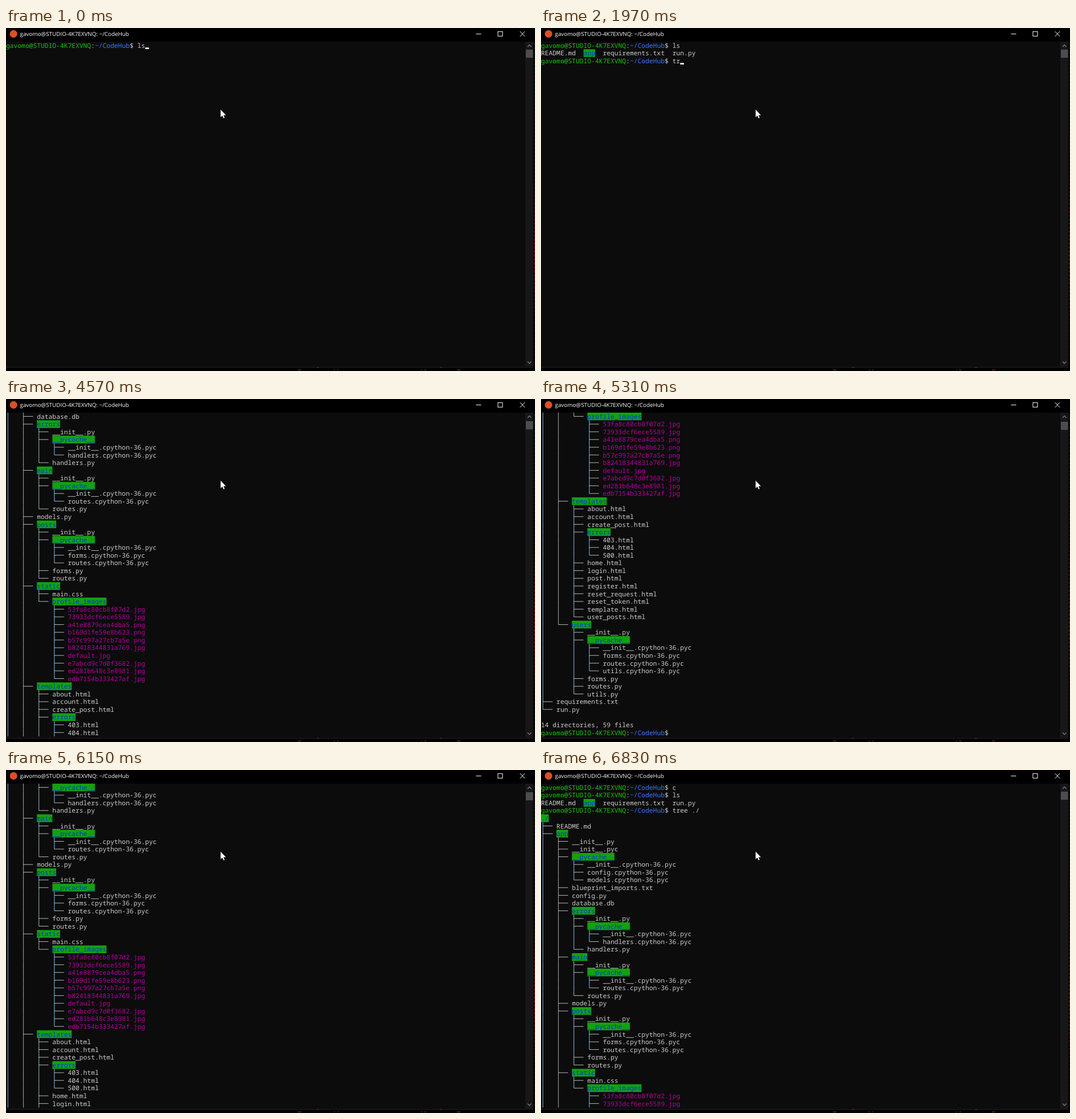
An HTML page that plays this animation: 928 px wide and 603 px high, repeating every 8000 ms.

```html
<!DOCTYPE html>
<html lang="en">
<head>
<meta charset="utf-8">
<title>Terminal</title>
<style>
  html, body { margin: 0; width: 100%; height: 100%; overflow: hidden; background: #000; }
  svg { display: block; }
  text { white-space: pre; text-rendering: geometricPrecision; }
  #buffer text { font: 11.3px "Noto Sans Mono", monospace; }
  #title { font: 9.85px "Open Sans", sans-serif; fill: #fff; }
</style>
</head>
<body>
<svg width="928" height="603" xmlns="http://www.w3.org/2000/svg">
  <defs>
    <linearGradient id="edge" x1="0" y1="0" x2="0" y2="1">
      <stop offset="0" stop-color="#0b171c"/>
      <stop offset=".42" stop-color="#170f13"/>
      <stop offset=".55" stop-color="#4a1013"/>
      <stop offset=".66" stop-color="#7c1214"/>
      <stop offset=".78" stop-color="#3a0c0e"/>
      <stop offset=".86" stop-color="#120b0d"/>
      <stop offset="1" stop-color="#0c0a0c"/>
    </linearGradient>
  </defs>
  <rect width="928" height="603"/>
  <rect y="24" width="925" height="571.5" fill="#0c0c0c"/>
  <rect y="595.5" width="925" height="2" fill="#1b1718"/>

  <!-- desktop showing past the window -->
  <rect x="926" y="24" width="2" height="573" fill="url(#edge)"/>
  <path d="M927 24V597" stroke="#000" stroke-width="2" stroke-dasharray="3 4" opacity=".6"/>
  <path d="M512 601h6M575 601h2M581 601h2M728 601h2M734 601h3M791 601h6" stroke="#5a2420" stroke-width="1.5"/>
  <path d="M545 596.5h4M761 596.5h4" stroke="#4a3a3a"/>

  <!-- title bar -->
  <circle cx="13.2" cy="10.4" r="6.6" fill="#dd4f22"/>
  <text id="title" x="24.5" y="14.4"></text>
  <g fill="none" stroke="#fff">
    <path d="M824.5 10.5h9"/>
    <rect x="863" y="6.3" width="8" height="8"/>
    <path d="M901.7 6l8.6 8.8M910.3 6l-8.6 8.8"/>
  </g>

  <!-- scroll bar -->
  <rect x="911" y="24" width="14" height="571.5" fill="#171717"/>
  <rect id="thumb" x="912" width="12.5" height="14.3" fill="#4d4d4d"/>
  <path d="M915 33l3.2-3.3 3.2 3.3M915 586.5l3.2 3.3 3.2-3.3" fill="none" stroke="#808080" stroke-width="1.2"/>

  <svg y="23.8" width="911" height="569.7" overflow="hidden">
    <g id="buffer"></g>
  </svg>

  <path d="M376.3 143v14.2l3.2-2.9 2 4.6 2.3-1-2-4.5h4.3z" fill="#fff" stroke="#000" stroke-width=".4"/>
</svg>

<script>
const CELL_W = 6.78, CELL_H = 13.556, BASELINE = 11, LOOP = 8000;
const USER = 'gavomo@STUDIO-4K7EXVNQ', PATH = '~/CodeHub', COMMAND = 'tree ./';
const PROMPT_END = USER.length + PATH.length + 3;
const COLOR = {
  text: '#cccccc', user: '#16c60c', path: '#3b78ff',
  dir: '#0037da', dirBack: '#13a10e', image: '#b4009e'
};
const GUIDES = ['#5f9aca', '#8e9094', '#7f9fb5', '#6ba0c8'];

// One leading space per level, a closing slash marks a directory.
const TREE = `README.md
app/
 __init__.py
 __init__.pyc
 __pycache__/
  __init__.cpython-36.pyc
  config.cpython-36.pyc
  models.cpython-36.pyc
 blueprint_imports.txt
 config.py
 database.db
 errors/
  __init__.py
  __pycache__/
   __init__.cpython-36.pyc
   handlers.cpython-36.pyc
  handlers.py
 main/
  __init__.py
  __pycache__/
   __init__.cpython-36.pyc
   routes.cpython-36.pyc
  routes.py
 models.py
 posts/
  __init__.py
  __pycache__/
   __init__.cpython-36.pyc
   forms.cpython-36.pyc
   routes.cpython-36.pyc
  forms.py
  routes.py
 static/
  main.css
  profile_images/
   53fa8c80cb8f07d2.jpg
   73933dcf6ece5589.jpg
   a41e8879cea4dba5.png
   b169d1fe59e8b623.png
   b57c997a27cb7a5e.png
   b82418344831a769.jpg
   default.jpg
   e7abcd9c7d0f3682.jpg
   ed281b648c3e8981.jpg
   edb7154b333427af.jpg
 templates/
  about.html
  account.html
  create_post.html
  errors/
   403.html
   404.html
   500.html
  home.html
  login.html
  post.html
  register.html
  reset_request.html
  reset_token.html
  template.html
  user_posts.html
 users/
  __init__.py
  __pycache__/
   __init__.cpython-36.pyc
   forms.cpython-36.pyc
   routes.cpython-36.pyc
   utils.cpython-36.pyc
  forms.py
  routes.py
  utils.py
requirements.txt
run.py`.split('\n').map(line => {
  const name = line.trimStart();
  return { name, depth: line.length - name.length };
});

// [start ms, top row, last printed row, typed letters of COMMAND, cursor column or -1]
const P = PROMPT_END;
const STEPS = [
  [0, 1, 1, 0, P + 2], [170, 1, 3, 0, P], [1140, 1, 3, 0, -1], [1690, 1, 3, 0, P],
  [1790, 1, 3, 1, P + 1], [1970, 1, 3, 2, P + 2], [2620, 1, 3, 3, P + 3],
  [2810, 1, 3, 4, P + 4], [3370, 1, 3, 5, P + 5], [3730, 1, 3, 6, P + 6],
  [3920, 1, 3, 7, P + 7], [4570, 15, 56, 7, -1], [4660, 39, 80, 7, P],
  [5310, 39, 80, 7, -1], [5810, 33, 80, 7, -1], [5900, 27, 80, 7, -1],
  [6040, 24, 80, 7, -1], [6150, 18, 80, 7, -1], [6250, 12, 80, 7, -1],
  [6360, 9, 80, 7, -1], [6540, 3, 80, 7, -1], [6830, 0, 80, 7, -1]
];

const byId = id => document.getElementById(id);
const buffer = byId('buffer'), thumb = byId('thumb');
const rows = [];

function add(parent, tag, attrs) {
  const node = document.createElementNS('http://www.w3.org/2000/svg', tag);
  for (const key in attrs) node.setAttribute(key, attrs[key]);
  return parent.appendChild(node);
}

function newRow() {
  const row = add(buffer, 'g', { transform: `translate(0 ${rows.length * CELL_H})` });
  rows.push(row);
  return row;
}

function write(row, col, string, fill = COLOR.text) {
  const node = add(row, 'text', { x: col * CELL_W, y: BASELINE, fill });
  node.textContent = string;
  return node;
}

function writeDir(row, col, name) {
  add(row, 'rect', {
    x: col * CELL_W, width: name.length * CELL_W, height: CELL_H, fill: COLOR.dirBack
  });
  write(row, col, name, COLOR.dir);
}

function prompt(command) {
  const row = newRow();
  write(row, 0, USER, COLOR.user);
  write(row, USER.length, ':');
  write(row, USER.length + 1, PATH, COLOR.path);
  write(row, PROMPT_END - 2, '$');
  return write(row, PROMPT_END, command);
}

function isLast(index) {
  const { depth } = TREE[index];
  const next = TREE.slice(index + 1).find(item => item.depth <= depth);
  return !next || next.depth < depth;
}

function guide(row, level, bottom) {
  const x = (level * 4 + .5) * CELL_W;
  add(row, 'path', { d: `M${x} 0V${bottom}`, stroke: GUIDES[level], 'stroke-width': 1.2 });
  return x;
}

function drawTree() {
  const open = [];
  TREE.forEach(({ name, depth }, index) => {
    const row = newRow(), col = depth * 4 + 4, last = isLast(index);
    for (let level = 0; level < depth; level++) {
      if (open[level]) guide(row, level, CELL_H);
    }
    open[depth] = !last;
    const x = guide(row, depth, last ? CELL_H / 2 : CELL_H);
    add(row, 'path', {
      d: `M${x} ${CELL_H / 2}H${(col - 1) * CELL_W}`, stroke: COLOR.text, 'stroke-width': .9
    });
    if (name.endsWith('/')) writeDir(row, col, name.slice(0, -1));
    else write(row, col, name, /\.(jpg|png)$/.test(name) ? COLOR.image : COLOR.text);
  });
}

byId('title').textContent = `${USER}: ${PATH}`;
prompt('c');
prompt('ls');
const listing = newRow();
write(listing, 0, 'README.md');
writeDir(listing, 11, 'app');
write(listing, 16, 'requirements.txt');
write(listing, 34, 'run.py');
const typed = prompt('');
writeDir(newRow(), 0, './');
drawTree();
newRow();
write(newRow(), 0, '14 directories, 59 files');
prompt('');
const cursor = add(buffer, 'rect', { width: CELL_W, height: 2.6, fill: '#fff' });

let shown;
function show(step) {
  const [, top, last, letters, column] = step;
  buffer.setAttribute('transform', `translate(0 ${-top * CELL_H})`);
  rows.forEach((row, i) => row.setAttribute('display', i <= last ? 'inline' : 'none'));
  typed.textContent = COMMAND.slice(0, letters);
  cursor.setAttribute('display', column < 0 ? 'none' : 'inline');
  cursor.setAttribute('x', column * CELL_W);
  cursor.setAttribute('y', last * CELL_H + 10.6);
  thumb.setAttribute('y', 38 + Math.round(top * .064));
}

const start = performance.now();
function tick() {
  const time = Math.max(0, performance.now() - start) % LOOP;
  const step = STEPS.findLast(([from]) => from <= time);
  if (step !== shown) show(shown = step);
  requestAnimationFrame(tick);
}
tick();
</script>
</body>
</html>
```
